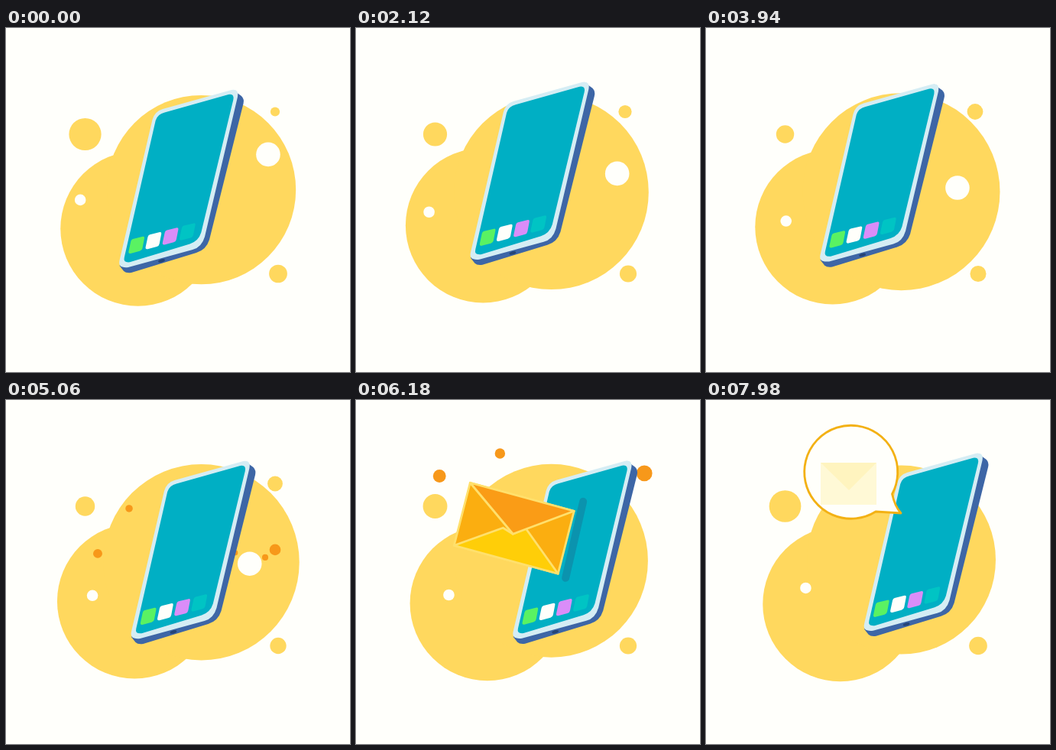
Recreate the animation shown at these times as an HTML page with a canvas. Size 450 px wide and 450 px high, loop 8 s.

```html
<!DOCTYPE html>
<html lang="en">
<head>
<meta charset="utf-8">
<title>Phone message</title>
<style>
  html, body { margin: 0; width: 100%; height: 100%; overflow: hidden; background: #fffffb; }
  canvas { display: block; width: 450px; height: 450px; }
</style>
</head>
<body>
<canvas id="stage" width="450" height="450"></canvas>
<script>
const ctx = document.getElementById('stage').getContext('2d');
const LOOP = 8000, PAPER = '#fffffb', YELLOW = '#ffd85e', ORANGE = '#f7981a';

const ramp = (t, from, to) => Math.max(0, Math.min(1, (t - from) / (to - from)));
const ease = p => (1 - Math.cos(Math.PI * p)) / 2;
const easeOut = p => 1 - (1 - p) ** 1.5;
// Slow swing around mid that is at mid + amp when t = peak.
const wave = (t, mid, amp, peak, period) => mid + amp * Math.cos(2 * Math.PI * (t - peak) / period);

const phone = {
  side: new Path2D('M297 81L308 89Q312 93 310.5 99L266 277Q262 290 249 294L164 320Q157 321 154 318L148.5 311Z'),
  face: new Path2D('M205 106L295 81Q305 79.5 303 90L260 273Q256 287 244 290L160 313Q146 314.5 148.5 304L191.5 120Q194.5 109 205 106Z'),
  screen: new Path2D('M207.5 110.5L291 87Q299 85.5 297.3 94L255.3 267.5Q252 278.5 240.5 282.5L162 306.3Q153 307.3 154.8 300L195.7 121Q198.5 112.5 207.5 110.5Z'),
  icon: new Path2D('M166 276L179 272.8Q181.5 272.5 181 275L178.5 288Q178 291 175 291.8L163 295Q159.7 295.5 160.5 292L163.3 279Q164 276.5 166 276Z')
};
const bubble = new Path2D('M243.5 123A61 61 0 1 0 222 146L255 148Q247 139 243.5 123Z');

// Each spark: early x, y, late x, y, largest radius
const sparks = [
  [120, 201, 105, 60, 8.5],
  [161, 142, 199, 42, 6.8],
  [352, 196, 387, 57, 10.5],
  [339, 206, 362, 73, 5.8],
  [300, 200, 352, 71, 4.7]
];

function circle(x, y, r, color) {
  ctx.fillStyle = color;
  ctx.beginPath();
  ctx.arc(x, y, r, 0, 2 * Math.PI);
  ctx.fill();
}

function fill(path, color) {
  ctx.fillStyle = color;
  ctx.fill(path);
}

function outline(path, color, width) {
  ctx.strokeStyle = color;
  ctx.lineWidth = width;
  ctx.lineJoin = 'round';
  ctx.stroke(path);
}

function layer(draw, t) {
  ctx.save();
  draw(t);
  ctx.restore();
}

function drawBackdrop(t) {
  ctx.fillStyle = PAPER;
  ctx.fillRect(0, 0, 450, 450);

  const lobe = (mid, amp, peak) => wave(t, mid, amp, peak, 10000);
  circle(lobe(170.3, -5.3, 3200), lobe(262.7, -4.5, 2400), 101.3, YELLOW);
  circle(255.5, lobe(212, 3, 2700), lobe(126, 3, 3900), YELLOW);

  const spot = (mid, amp) => wave(t, mid, amp, 4100, 9000);
  circle(103.5, 139, spot(16.5, -4.8), YELLOW);
  circle(352, 109.5, spot(8.2, 2.2), YELLOW);
  circle(356, 321.5, spot(11.2, -0.7), YELLOW);

  const hole = (mid, amp, peak) => wave(t, mid, amp, peak, 15000);
  circle(hole(322.5, 22, 900), hole(184.5, 30, 5400), 15.8, PAPER);
  circle(hole(113, -18.5, 1300), hole(237, 19, 5400), 7.3, PAPER);
}

function drawSparks(t) {
  const life = ramp(t, 4500, 7500);
  if (life === 0 || life === 1) return;
  const size = Math.sin(Math.PI * life) ** 0.6;
  const p = easeOut(Math.min(1, (t - 5060) / 1960));
  for (const [x1, y1, x2, y2, r] of sparks) {
    circle(x1 + (x2 - x1) * p, y1 + (y2 - y1) * p, r * size, ORANGE);
  }
}

function drawPhone(t) {
  const bob = wave(t, -5.9, 5.9, 0, 5600);
  ctx.translate(57 * ease(ramp(t, 4700, 5740)) - 0.14 * bob, bob);
  fill(phone.side, '#3d66a6');
  fill(phone.face, '#d5edf4');
  fill(phone.screen, '#00afc4');
  ctx.fillStyle = '#254477';
  ctx.beginPath();
  ctx.ellipse(203.5, 304.5, 4.5, 2, -0.27, 0, 2 * Math.PI);
  ctx.fill();

  const slot = ease(ramp(t, 5720, 5900)) * (1 - ease(ramp(t, 6400, 6580)));
  if (slot > 0) {
    ctx.lineCap = 'round';
    const line = new Path2D();
    line.moveTo(228.5 + 11.5 * slot, 184 - 50 * slot);
    line.lineTo(228.5 - 11.5 * slot, 184 + 50 * slot);
    outline(line, '#0b93ae', 10);
  }
  for (const color of ['#5af262', PAPER, '#da8df8', '#00c4c4']) {
    fill(phone.icon, color);
    ctx.translate(22.2, -5.8);
  }
}

function drawEnvelope(t) {
  const p = ramp(t, 5900, 6560);
  if (p === 0 || p === 1) return;
  // Only the part left of the slot has come out.
  ctx.clip(new Path2D('M-400 0H328L228 450H-400Z'));
  ctx.globalAlpha = 1 - ramp(t, 6350, 6560);
  const travel = 1.12 - 1.97 * easeOut(p);
  ctx.translate(136 * travel - 0.7, 37 * travel);
  const parts = {
    '#fbae10': 'M149 108L285 145L264 227L128 190Z',
    '#ffce08': 'M128 190L192 167L205 175L222 168L264 227Z',
    '#fa9c16': 'M149 108L285 145L205 175Z'
  };
  for (const [color, shape] of Object.entries(parts)) {
    const path = new Path2D(shape);
    fill(path, color);
    outline(path, '#ffe06c', 2.8);
  }
}

function drawBubble(t) {
  if (t <= 6740) return;
  const grow = Math.sin(Math.PI / 2 * ramp(t, 6740, 7400));
  const scale = 1.14 * grow - 0.14 * ease(ramp(t, 7400, 7840));
  // Swings and grows about the tip of its tail.
  ctx.translate(255, 147);
  ctx.rotate(0.19 * (scale - 1));
  ctx.scale(scale, scale);
  ctx.translate(-255, -147);
  fill(bubble, PAPER);
  outline(bubble, '#f3b114', 2.8);
  ctx.globalAlpha = 0.9 * ramp(t, 7820, 7980);
  fill(new Path2D('M150 82H223V137H150Z'), '#fff9d2');
  fill(new Path2D('M150 82H223L187 118Z'), '#fff4bd');
}

function frame(now) {
  const t = now % LOOP;
  for (const draw of [drawBackdrop, drawSparks, drawPhone, drawEnvelope, drawBubble]) layer(draw, t);
}

const start = performance.now();
function tick(now) {
  frame(Math.max(0, now - start));
  requestAnimationFrame(tick);
}
requestAnimationFrame(tick);
</script>
</body>
</html>
```
